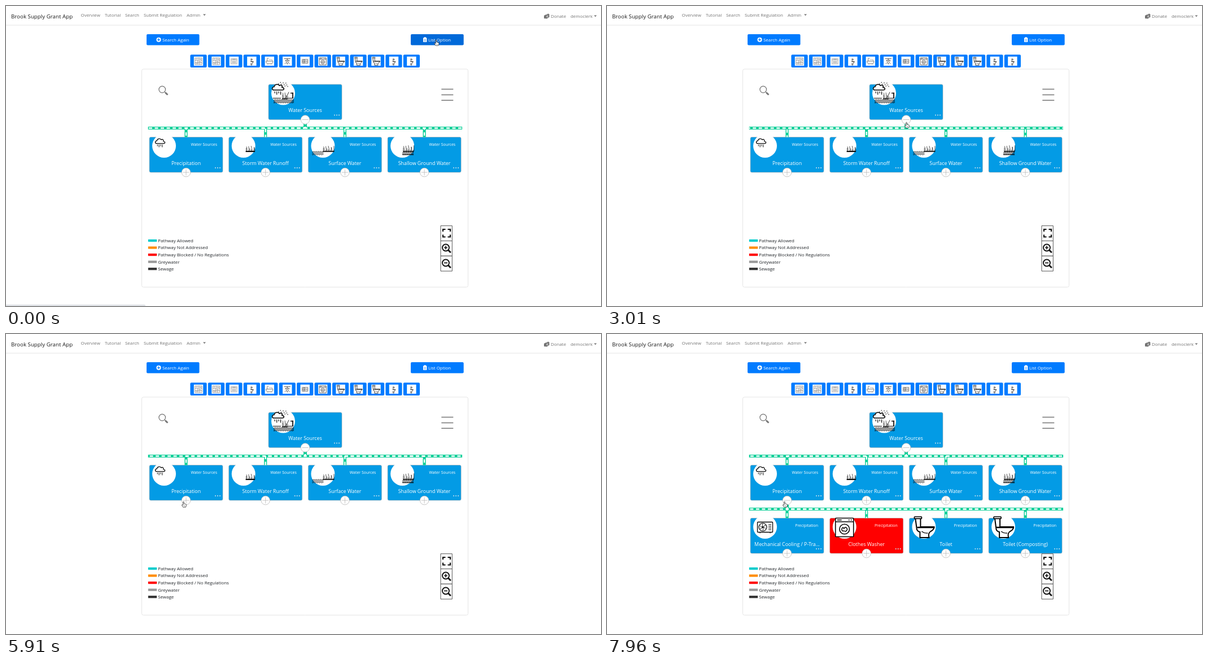
Recreate the animation shown at these times as an HTML page with a canvas. Size 1054 px wide and 532 px high, loop 7.99 s.

```html
<!DOCTYPE html>
<html lang="en">
<head>
<meta charset="utf-8">
<title>Water pathways</title>
<style>
html, body { margin: 0; width: 100%; height: 100%; overflow: hidden; background: #fff; }
canvas { display: block; width: 1054px; height: 532px; }
</style>
</head>
<body>
<canvas id="stage"></canvas>
<script>
const W = 1054, H = 532, LOOP = 7990;
const canvas = document.getElementById('stage');
const c = canvas.getContext('2d');
const dpr = window.devicePixelRatio || 1;
canvas.width = W * dpr;
canvas.height = H * dpr;

const BLUE = '#039be5', RED = '#ff0000', GREEN = '#0bcf98', GRAY = '#757575';
const CARD_W = 130, CARD_H = 62.5, GAP = 140.7;
const COLLAPSE = 3320, EXPAND = 4080, EXPAND_SUB = 6860, GROW = 420;
const DASH = 6, SPACE = 4.5, DASH_TIME = 668;

// ---------- drawing helpers ----------
function fill(d, color = '#000') {
  c.fillStyle = color;
  c.fill(new Path2D(d));
}
function ink(d, width = 1, color = '#000') {
  c.lineWidth = width;
  c.strokeStyle = color;
  c.stroke(new Path2D(d));
}
function box(x, y, w, h, color, r = 0, edge, edgeWidth = 1) {
  c.beginPath();
  c.roundRect(x, y, w, h, r);
  if (color) { c.fillStyle = color; c.fill(); }
  if (edge) { c.strokeStyle = edge; c.lineWidth = edgeWidth; c.stroke(); }
}
function disc(x, y, r, color, edge, edgeWidth = 1) {
  c.beginPath();
  c.arc(x, y, r, 0, 7);
  if (color) { c.fillStyle = color; c.fill(); }
  if (edge) { c.strokeStyle = edge; c.lineWidth = edgeWidth; c.stroke(); }
}
function text(s, x, y, size, color, align = 'left') {
  c.font = size + 'px "Open Sans", "Noto Sans", sans-serif';
  c.textAlign = align;
  c.fillStyle = color;
  c.fillText(s, x, y + size * 0.36);
}
function at(x, y, scale, draw) {
  c.save();
  c.translate(x, y);
  c.scale(scale, scale);
  draw();
  c.restore();
}

// ---------- icons, centred on 0,0 ----------
function reeds(x, y, w, h) {
  ink(`M${x} ${y}h${w}`, 1.4);
  for (let i = 0; i < w / 1.7; i++) {
    const bx = x + 0.8 + i * 1.7, tall = h * (0.6 + 0.4 * Math.sin(i * 2.4));
    ink(`M${bx} ${y}q0 ${-tall * 0.6} ${Math.sin(i * 4) * 1.6} ${-tall}`, 0.65);
  }
}
function waves(x, y, w, rows) {
  for (let r = 0; r < rows; r++) {
    let d = `M${x} ${y + r * 2.4}`;
    for (let i = 0; i < w / 4; i++) d += 'q1 1.2 2 0t2 0';
    ink(d, 1);
  }
}
function cloud(x, y, s) {
  at(x, y, s, () => {
    ink('M-6 4C-10 4 -10 -1 -6 -1C-6 -5 0 -6 2 -3C5 -5 7 -2 6 0C10 0 10 4 6 4Z', 1.3);
    ink('M-5 6v3M-2 6v5M1 6v3M4 6v5', 1);
  });
}
const sources = () => {
  cloud(-9, -10, 1.15);
  for (let i = 0; i < 11; i++) {
    disc(-8 + i * 1.6, -16.5 + 3.2 * Math.sin(i * 2.1) + i * 0.2, 0.75, '#000');
  }
  reeds(-2, 10, 10, 12);
  ink('M5 9L10 -2', 0.8);
  ink('M17 9V-1M13 0h5', 1.7);
  ink('M-18 9h14M8 9h10', 1.2);
  waves(-17, 12, 35, 3);
};
const rain = () => cloud(-7, -8, 0.95);
const runoff = () => { reeds(4, 10, 16, 10); ink('M4 10h16', 1.6); };
const surface = () => { waves(-19, 10.5, 20, 3); reeds(0, 10, 20, 10); };
const shallow = () => { reeds(1, 10, 19, 11); waves(0, 12, 20, 2); ink('M0 15.8h20', 1); };
const ground = () => { shallow(); ink('M10 -8V12M8 -5l2 -3l2 3', 1.2); };
const drip = () => ink('M8 -2q5 7 0 10q-5 -3 0 -10Z', 1.2);
const cooler = () => {
  box(-13.5, -8.5, 27, 18, '#fff', 1, '#000', 1.3);
  disc(-4, 0.5, 7, null, '#000', 1.2);
  disc(-4, 0.5, 1.5, '#000');
  for (let i = 0; i < 6; i++) {
    const a = i * Math.PI / 3;
    ink(`M-4 .5q${3 * Math.cos(a)} ${3 * Math.sin(a)} ${6 * Math.cos(a + .5)} ${6 * Math.sin(a + .5)}`, 0.9);
  }
  ink('M6 -4h5M6 -1h5M6 2h5M6 5h5M-9 9.5v2M9 9.5v2', 1);
};
const washer = () => {
  box(-16, -15.5, 32, 33, '#fff', 1, '#000', 1.6);
  ink('M-16 -9h32M-13 -12.3h8M7 -12.3h2M11 -12.3h2', 1.4);
  disc(0, 4, 8.8, null, '#000', 1.6);
  ink('M-5 4q2 -5 4 -1q3 -5 6 1q-2 6 -6 3q-3 2 -4 -3', 1.5);
};
const toilet = () => {
  box(-17, -18, 13, 3.4, '#fff', 1, '#000', 1.7);
  ink('M-15 -14L-13 1Q-13 8 -7 9V19H9Q7 11 12 8Q18 5 18 0H-6L-6 -14', 2);
  ink('M-12 1H19', 2.4);
  ink('M-4 8Q1 12 7 11', 1.3);
};
const urinal = () => {
  ink('M-5 -10h7v6M-3 -10v12h10q0 7 -6 7v9h-5v-9M-6 2h14', 1.8);
};
const shelves = () => {
  ink('M-16 -15h32M-16 -4h32M-16 7h32M-16 16h32M-16 -15v31M16 -15v31M2 -15v11M-5 -4v11M6 7v9', 1.8, '#777');
  ink('M-12 -10h9M6 -9h7M-1 2h12M-12 11h13', 3, '#999');
};
const dishes = () => {
  box(-14, -12, 28, 25, null, 1, '#888', 1.8);
  ink('M-14 -6h28M-10 0h20M-10 4h20M-10 8h20M-8 -9h16', 1.8, '#888');
};
const bath = () => {
  ink('M-16 0H16Q16 12 8 12H-8Q-16 12 -16 0M-11 0V-12q4 -5 7 0M-8 12v3M8 12v3', 1.8, '#444');
  ink('M-2 -7h14v6', 1.5, '#777');
};
const shower = () => {
  ink('M-15 -12h30M0 -12v8M-9 -4h18M-8 -4v5M8 -4v5', 2.2, '#333');
  disc(0, 6, 5, null, '#333', 2);
  ink('M-10 8v6M10 8v6M0 12v4', 1.8, '#555');
};
const TOOLS = [shelves, shelves, dishes, urinal, bath, shower, cooler, washer,
  toilet, toilet, toilet, urinal, urinal];

// ---------- chart data ----------
const root = { name: 'Water Sources', icon: sources, x: 465, y: 139 };
const row = (y, group, items) => items.map(([name, icon, color], i) =>
  ({ name, icon, color, group, y, x: 254 + (i - 1) * GAP }));
const first = row(232.5, 'Water Sources', [
  ['Condensate', drip], ['Precipitation', rain], ['Storm Water Runoff', runoff],
  ['Surface Water', surface], ['Shallow Ground Water', shallow], ['Ground Water', ground]]);
const second = row(326.5, 'Precipitation', [
  ['Lavatory', urinal], ['Mechanical Cooling / P-Tra...', cooler], ['Clothes Washer', washer, RED],
  ['Toilet', toilet], ['Toilet (Composting)', toilet], ['Urinal', urinal]]);
const rainCard = first[1];

function card(n, x = n.x, y = n.y, settled = true) {
  box(x, y, CARD_W, CARD_H, n.color || BLUE, 2.5, '#aeaeae', 0.6);
  disc(x + 26, y + 15.5, 21, '#fff');
  at(x + 26, y + 15.5, 1, n.icon);
  text(n.name, x + 65, y + 46, 8.9, '#fff', 'center');
  if (n.group) text(n.group, x + 120, y + 13, 6.95, '#fff', 'right');
  if (settled) for (let i = 0; i < 3; i++) disc(x + 117 + i * 4, y + 54.5, 1.05, '#c5dfee');
}
function cards(list, parent, p) {
  for (const n of list) {
    card(n, parent.x + (n.x - parent.x) * p, parent.y + (n.y - parent.y) * p, p === 1);
  }
}
function pipes(list, parent, t) {
  const paths = list.map(n =>
    `M${parent.x + 65} ${parent.y + CARD_H}V${n.y - 16}H${n.x + 65}V${n.y}`);
  paths.forEach(d => ink(d, 5.2, GREEN));
  c.save();
  c.setLineDash([DASH, SPACE]);
  c.lineDashOffset = -(2.5 + t / DASH_TIME * (DASH + SPACE));
  paths.forEach(d => ink(d, 2.3, '#fff'));
  c.restore();
}
function toggle(n, open) {
  const x = n.x + 65, y = n.y + CARD_H;
  disc(x, y, 7.8, '#fff', '#b8b8b8', 0.8);
  ink(`M${x - 5.5} ${y}h11` + (open ? '' : `M${x} ${y - 5.5}v11`), 0.8, '#b8b8b8');
}
function growth(t) {
  const x = Math.min(1, Math.max(0, t / GROW));
  return 1 - (1 - x) ** 2;
}

function chart(t) {
  const open = t < COLLAPSE || t >= EXPAND, sub = t >= EXPAND_SUB;
  c.save();
  c.beginPath();
  c.rect(251.7, 120, 556.4, 370);
  c.clip();
  card(root);
  if (open) cards(first, root, t < COLLAPSE ? 1 : growth(t - EXPAND));
  if (sub) cards(second, rainCard, growth(t - EXPAND_SUB));
  if (open) pipes(first, root, t);
  if (sub) pipes(second, rainCard, t);
  toggle(root, open);
  if (open) first.forEach(n => toggle(n, sub && n === rainCard));
  if (sub) second.forEach(n => toggle(n, false));
  c.restore();
}

// ---------- page ----------
function caret(x, y, color) { fill(`M${x} ${y}h5l-2.5 2.7Z`, color); }

function navbar() {
  text('Brook Supply Grant App', 9, 18, 9.75, '#1a1a1a');
  [['Overview', 132.5], ['Tutorial', 175], ['Search', 211], ['Submit Regulation', 244], ['Admin', 320]]
    .forEach(([s, x]) => text(s, x, 16, 7.95, GRAY));
  caret(349, 14.6, GRAY);
  at(958, 18, 1, () => {
    fill('M-5 -1L-1 -3L1 -1L-1 1L1 2L4 -1L5 1L0 4.5L-5 4Z', GRAY);
    fill('M-1 -3L3 -4.5L5 -2L2 1L0 0L2 -1Z', GRAY);
  });
  text('Donate', 965, 18, 7.95, GRAY);
  text('democlerk', 1000, 18, 7.95, GRAY);
  caret(1041.5, 16.6, GRAY);
  box(0, 33.6, W, 0.9, '#e6e6e6');
}

function buttons(hover) {
  box(249, 50, 93.5, 19.5, '#007bff', 2);
  disc(270.5, 59.8, 4.1, '#fff');
  ink('M268 59.8h5M270.5 57.3v5', 1.3, '#007bff');
  text('Search Again', 277, 60, 7.95, '#fff');

  const color = hover ? '#0069d9' : '#007bff';
  box(717, 50, 93.7, 19.5, color, 2);
  box(739, 56.3, 6.4, 7.8, '#fff', 0.8);
  disc(742.2, 56.3, 1.4, '#fff');
  ink('M740.6 59h3.2M740.6 60.7h3.2M740.6 62.4h3.2', 0.6, color);
  text('List Option', 748, 60, 7.9, '#fff');

  TOOLS.forEach((icon, i) => {
    const x = 326.4 + i * 31.45;
    box(x, 86.3, 29.2, 22.8, '#007bff', 2);
    box(x + 6.4, 89.7, 16.4, 16.2, '#fff');
    at(x + 14.6, 97.8, 0.38, icon);
  });
}

function lens(x, y, sign) {
  disc(x - 1, y - 1, 6, null, '#111', 1.9);
  ink(`M${x + 3.3} ${y + 3.3}l4.5 4.5`, 2.8, '#111');
  ink(`M${x - 4} ${y - 1}h6` + (sign ? `M${x - 1} ${y - 4}v6` : ''), 1.7, '#111');
}

function chrome() {
  disc(276.7, 148, 5.8, null, GRAY, 1.3);
  ink('M281 152l1.8 1.8', 1.2, GRAY);
  ink('M282.2 153.4l4.2 4.2', 2.8, GRAY);
  ink('M771.3 147.5h21M771.3 157.5h21M771.3 167.3h21', 1.4, GRAY);

  [['Pathway Allowed', '#00cccc'], ['Pathway Not Addressed', '#ff8c00'],
   ['Pathway Blocked / No Regulations', '#ff0000'], ['Greywater', '#999'], ['Sewage', '#333']]
    .forEach(([s, color], i) => {
      const y = 416 + i * 12.55;
      box(251.8, y - 2.1, 15.3, 4.2, color);
      text(s, 269.2, y, 7.95, '#212529');
    });

  for (let i = 0; i < 3; i++) box(770, 389.7 + i * 26.8, 20.3, 26.8, '#fff', 0, '#555', 1);
  ink('M774 400v-4h4.5M782.5 396h4.5v4M787 405.5v4h-4.5M778.5 409.5h-4.5v-4', 2.2, '#111');
  lens(780, 429.5, true);
  lens(780, 456.5, false);
}

// ---------- pointer ----------
const PATH = [ // time, x, y
  [0, 762, 60], [1480, 762, 60], [1640, 750, 63], [2070, 590.5, 132], [2420, 530.5, 206],
  [4860, 530.5, 206], [5120, 432.5, 202], [5230, 432.5, 202], [5680, 315, 296], [5900, 314.5, 297], [LOOP, 314.5, 297]];

function pointer(t) {
  const i = PATH.findIndex(k => k[0] > t);
  const [t0, x0, y0] = PATH[i - 1], [t1, x1, y1] = PATH[i];
  const u = (t - t0) / (t1 - t0), e = u * u * (3 - 2 * u);
  return { x: x0 + (x1 - x0) * e, y: y0 + (y1 - y0) * e };
}
const inside = (p, x, y, w, h) => p.x >= x && p.x <= x + w && p.y >= y && p.y <= y + h;
const onCard = (p, n) => inside(p, n.x, n.y, CARD_W, CARD_H) ||
  Math.hypot(p.x - n.x - 65, p.y - n.y - CARD_H) < 9;

function drawPointer(p, hand) {
  at(p.x, p.y, 1, () => {
    c.lineJoin = 'round';
    const d = hand
      ? 'M-.8 .7Q0 -.5 .8 .7V4L3 4.4L4.8 5.2V7.8L3.8 10.2H-.8L-3 6.8Q-3.2 5.3 -1.8 5.8L-.8 6.7Z'
      : 'M0 0V7L1.6 5.6L2.7 8L3.7 7.5L2.7 5.2H4.8Z';
    fill(d, '#fff');
    ink(d, 0.75, '#222');
    if (hand) ink('M1 7v1.8M2.4 7v1.8', 0.5, '#444');
  });
}

function render(now) {
  const t = now % LOOP;
  c.setTransform(dpr, 0, 0, dpr, 0, 0);
  c.fillStyle = '#fff';
  c.fillRect(0, 0, W, H);

  const p = pointer(t), hover = inside(p, 717, 50, 93.7, 19.5);
  navbar();
  buttons(hover);
  box(240.5, 111.9, 578, 386.6, '#fff', 3, '#e3e3e3', 0.9);
  chart(t);
  chrome();
  if (t < 2250) box(-3, 529.4, 250, 6, '#dee1e6', 2);
  drawPointer(p, hover || [root, ...first].some(n => onCard(p, n)));
}

const began = performance.now();
function tick() {
  render(performance.now() - began);
  requestAnimationFrame(tick);
}
tick();
</script>
</body>
</html>
```
